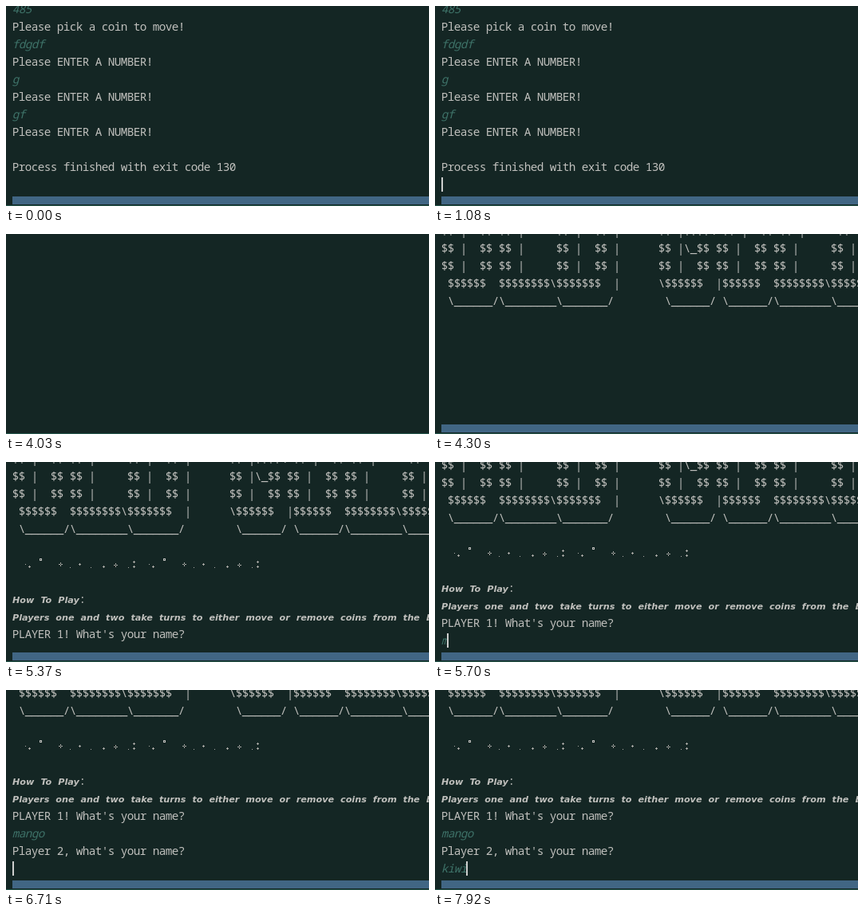
An HTML page with a canvas that plays this animation: 530 px wide and 251 px high, repeating every 8000 ms.

```html
<!DOCTYPE html>
<html lang="en">
<head>
<meta charset="utf-8">
<style>
  html, body { margin: 0; width: 100%; height: 100%; overflow: hidden; background: #142624; }
  canvas { display: block; }
</style>
</head>
<body>
<canvas id="stage" width="530" height="251"></canvas>
<script>
const ctx = document.getElementById('stage').getContext('2d', { alpha: false });
const LOOP = 8000, LEFT = 8, CELL = 8, LINE = 22, LAST = 229;
const MONO = '14.3px "Noto Sans Mono", "DejaVu Sans Mono", monospace';
const SANS = 'italic bold 11.2px "DejaVu Sans", sans-serif';
const BACK = '#142624', TEXT = '#c0c0bd', INPUT = '#3e7268';

const out = text => ({ text, color: TEXT, font: MONO });
const input = text => ({ text, color: INPUT, font: 'italic ' + MONO });
const head = (text, tail = '') => ({ text, tail, color: TEXT, font: SANS });
const sparkles = { sparkles: true };

const askNumber = out('Please ENTER A NUMBER!');
const oldRun = [
  input('485'), out('Please pick a coin to move!'),
  input('fdgdf'), askNumber, input('g'), askNumber, input('gf'), askNumber,
  out(''), out('Process finished with exit code 130'), out('')
];

const newRun = [
  out('$$ |  $$ $$ |     $$ |  $$ |      $$ |$$$$\\ $$ |  $$ $$ |     $$ |'),
  out('$$ |  $$ $$ |     $$ |  $$ |      $$ |\\_$$ $$ |  $$ $$ |     $$ |'),
  out('$$ |  $$ $$ |     $$ |  $$ |      $$ |  $$ $$ |  $$ $$ |     $$ |'),
  out(' $$$$$$  $$$$$$$$\\$$$$$$$  |      \\$$$$$$  |$$$$$$  $$$$$$$$\\$$$$$$$'),
  out(' \\______/\\________\\_______/        \\______/ \\______/\\________\\_______/'),
  out(''), sparkles, out(''),
  head('How To Play', ':'),
  head('Players one and two take turns to either move or remove coins from the board'),
  out("PLAYER 1! What's your name?")
];
const secondPrompt = out("Player 2, what's your name?");

const printTimes = [4300, 4367, 4433, 4500], printedRows = [5, 7, 10, 11];
const names = [
  { text: 'mango', keys: [5700, 5840, 5980, 6075, 6170] },
  { text: 'kiwi', keys: [7650, 7790, 7855, 7920] }
];

// x, height above the baseline, arm length (0 is a dot, -1 a ring, 2 an open star)
const sparks = [
  [24, 5, 0], [29, 2, 1], [43, 11, -1], [68, 5, 2], [80, 1, 0], [92, 5, 1],
  [106, 1, 0], [122, 2, 1], [137, 4, 2], [153, 1, 0], [160, 8, 1], [160, 2, 1]
];

const count = (times, t) => times.filter(k => t >= k).length;
const within = (t, a, b) => t >= a && t < b;

function rect(x, y, w, h, color) {
  ctx.fillStyle = color;
  ctx.fillRect(x, y, w, h);
}

function drawSparkles(base) {
  for (const shift of [0, 155]) {
    for (const [dx, up, arm] of sparks) {
      const x = dx + shift, y = base - up;
      if (arm < 0) {
        ctx.strokeStyle = TEXT;
        ctx.strokeRect(x - .5, y - .5, 2, 2);
      } else {
        const size = 2 * arm + 1;
        rect(x - arm, y, size, 1, '#a8a8a4');
        rect(x, y - arm, 1, size, '#a8a8a4');
        if (arm === 2) rect(x, y, 1, 1, BACK);
      }
    }
  }
}

function drawCells(text, x, base) {
  ctx.textAlign = 'center';
  [...text].forEach((c, i) => ctx.fillText(c, x + (i + .5) * CELL, base));
}

function drawRow(row, base) {
  if (row.sparkles) return drawSparkles(base);
  ctx.font = row.font;
  ctx.fillStyle = row.color;
  if (row.font !== SANS) return drawCells(row.text, LEFT, base);

  let x = LEFT;
  ctx.textAlign = 'left';
  for (const word of row.text.split(' ')) {
    ctx.fillText(word, x, base);
    x += ctx.measureText(word).width + CELL;
  }
  ctx.font = MONO;
  drawCells(row.tail, x - CELL, base);
}

// Draws rows so that the final one sits on the given baseline.
function drawRows(rows, lastBase) {
  rows.forEach((row, i) => drawRow(row, lastBase - (rows.length - 1 - i) * LINE));
}

function drawCursor(col, base) {
  rect(Math.max(LEFT, LEFT - 1 + col * CELL), base - 14, 2, 18, '#cecfce');
}

function draw(t) {
  rect(0, 0, 530, 251, BACK);
  rect(0, 250, 530, 1, '#24564c');
  if (within(t, 4030, 4300)) return;
  rect(8, 239, 522, 10, '#416684');

  if (t < 4030) {
    drawRows(oldRun, LAST);
    if (within(t, 1080, 1620) || within(t, 2080, 2490)) drawCursor(0, LAST);
  } else if (t < 5700) {
    const shown = printedRows[count(printTimes, t) - 1];
    drawRows(newRun.slice(0, shown), 221 - (newRun.length - shown) * LINE);
    if (within(t, 4910, 5370)) drawCursor(27, 221);
  } else {
    const second = t >= 6710;
    const [first, other] = names.map(n => n.text.slice(0, count(n.keys, t)));
    const rows = [...newRun, input(first)];
    if (second) rows.push(secondPrompt, input(other));
    drawRows(rows, LAST);
    if (!within(t, 7460, 7650)) drawCursor((second ? other : first).length, LAST);
  }
}

const start = performance.now();
function tick() {
  draw((performance.now() - start) % LOOP);
  requestAnimationFrame(tick);
}
tick();
</script>
</body>
</html>
```
